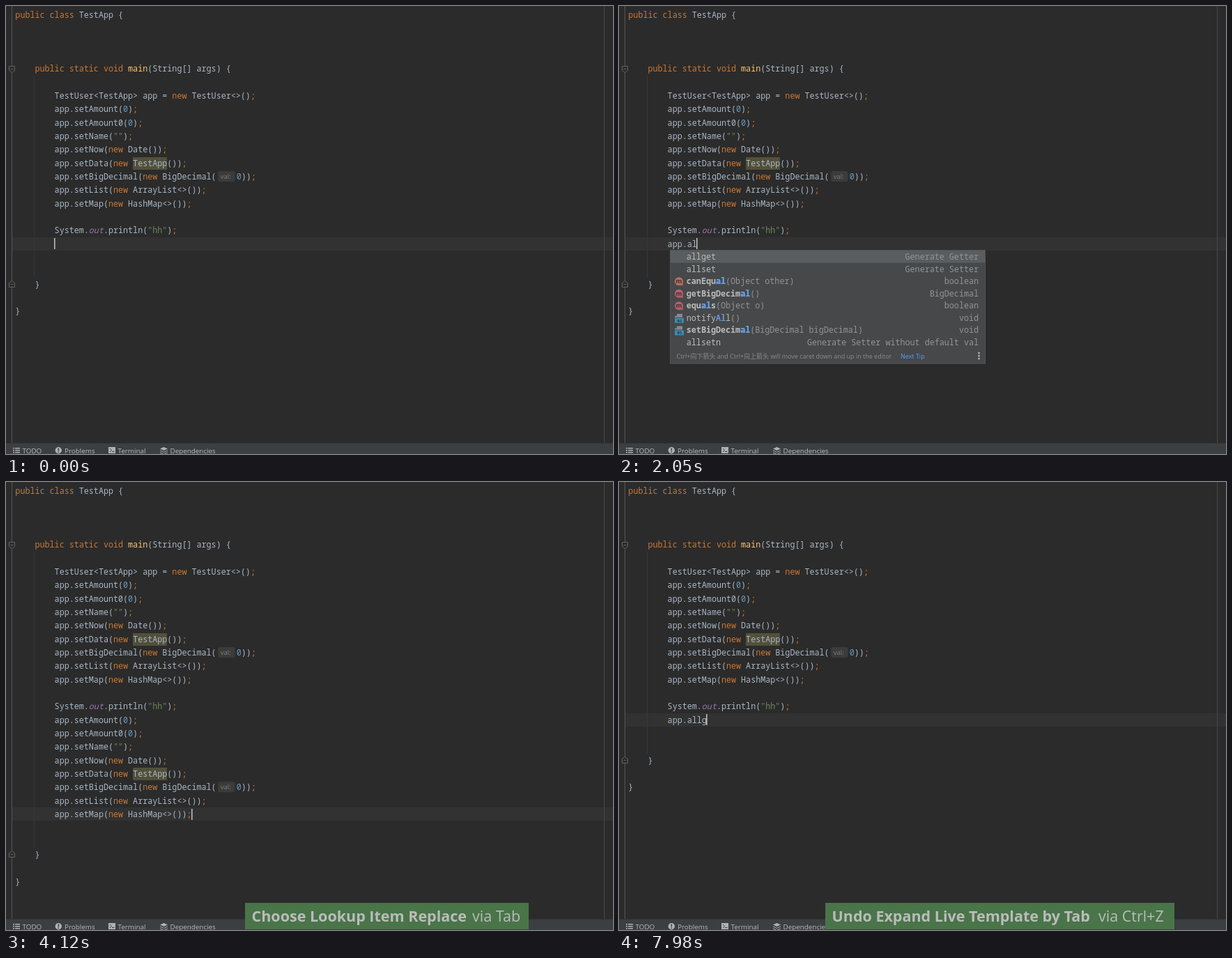
An HTML page with a canvas for the animation above (8000 ms loop, 871 px wide and 643 px high).

```html
<!DOCTYPE html>
<html lang="en">
<head>
<meta charset="utf-8">
<title>Setter templates</title>
<style>
  html, body { margin: 0; width: 100%; height: 100%; overflow: hidden; background: #2b2b2b; }
  canvas { display: block; }
</style>
</head>
<body>
<canvas id="stage" width="871" height="643"></canvas>
<script>
const ctx = document.getElementById('stage').getContext('2d');
const LOOP = 8000, CHAR = 7.032, ROW = 19.33, LEFT = 69.6;
const MONO = '"Noto Sans Mono", "DejaVu Sans Mono", monospace';
const SANS = '"Open Sans", "Noto Sans", "Noto Sans CJK SC", sans-serif';
const CODE = `11.72px ${MONO}`;
const INK = '#a9b7c6', BLUE = '#589df6';

const COLORS = { out: '#9876aa', main: '#ffc66d', ';': '#cc7832' };
for (const word of ['public', 'class', 'static', 'void', 'new']) COLORS[word] = '#cc7832';

// '@' marks a highlighted class, '#' the place of a parameter hint
const SETTERS = [
  'app.setAmount(0);',
  'app.setAmount0(0);',
  'app.setName("");',
  'app.setNow(new Date());',
  'app.setData(new @TestApp());',
  'app.setBigDecimal(new BigDecimal(#0));',
  'app.setList(new ArrayList<>());',
  'app.setMap(new HashMap<>());'
];

const TYPED = [
  [0, ''], [660, 'a'], [790, 'ap'], [930, 'app'], [1450, 'app.'], [1920, 'app.a'],
  [2050, 'app.al'], [2180, 'app.all'], [2380, 'app.alls'], [2450, 'app.allse'],
  [2590, 'app.allset'], [3790, null], [5390, 'app.allset'], [5930, null],
  [6590, 'app.allset'], [7050, 'app.allse'], [7190, 'app.alls'], [7320, 'app.all'],
  [7980, 'app.allg']
];
const CARET_OFF = [[460, 660], [3450, 3790], [4990, 5390]];

// icon, name, parameters, type; a leading '*' means bold
const GET = ['', 'allget', '', 'Generate Getter'];
const SET = ['', 'allset', '', 'Generate Setter'];
const SETN = ['', 'allsetn', '', 'Generate Setter without default val'];
const NOTIFY = ['lib', 'notifyAll', '()', 'void'];
const EQUAL = ['open', '*canEqual', '(Object other)', 'boolean'];
const EQUALS = ['m', '*equals', '(Object o)', 'boolean'];
const GET_BIG = ['m', '*getBigDecimal', '()', 'BigDecimal'];
const SET_BIG = ['lib', '*setBigDecimal', '(BigDecimal bigDecimal)', 'void'];
const AMOUNT = ['lib', '*setAmount', '(int amount)', 'void'];
const NAME = ['lib', '*setName', '(String name)', 'void'];
const DATA = ['lib', '*setData', '(TestApp data)', 'void'];
const MAP = ['lib', '*setMap', '(Map map)', 'void'];
const GET_NAME = ['m', '*getName', '()', 'String'];
const GET_DATA = ['m', '*getData', '()', 'TestApp'];
const POPUPS = [
  [860, 45, [
    ['m', '*app', '', 'TestUser<TestApp>'],
    ['m', 'Appendable', ' java.lang', ''],
    ['m', 'AppletContext', ' java.applet', ''],
    ['m', 'Applet', ' java.applet', ''],
    ['m', 'AppletStub', ' java.applet', '']]],
  [1190],
  [1590, 73, [AMOUNT, NAME, DATA, SET_BIG, MAP, GET_NAME, GET_DATA, GET_BIG, EQUALS, EQUAL, GET, SET], 11.5],
  [1990, 73, [GET, SET, AMOUNT, NAME, DATA, MAP, GET_NAME, GET_DATA, EQUAL, GET_BIG, EQUALS, NOTIFY], 11.5],
  [2050, 73, [GET, SET, EQUAL, GET_BIG, EQUALS, NOTIFY, SET_BIG, SETN]],
  [2180, 73, [GET, SET, NOTIFY, SETN]],
  [2380, 73, [SET, SETN]],
  [3720]
];

// start, box left, box right, action, shortcut, shortcut left
const TOASTS = [
  [3850, 343, 750, 'Choose Lookup Item Replace', 'via Tab', 669],
  [5390, 297, 796, 'Undo Choose Lookup Item Replace', 'via Ctrl+Z', 687],
  [5990, 342, 750, 'Expand Live Template by Tab', 'via Tab', 670],
  [6660, 296, 797, 'Undo Expand Live Template by Tab', 'via Ctrl+Z', 688]
];

const current = (list, t) => list.filter(step => step[0] <= t).pop();
const within = (t, spans) => spans.some(([a, b]) => t >= a && t < b);
const rowTop = row => 3 + ROW * row;

function rect(x, y, w, h, color) {
  ctx.fillStyle = color;
  ctx.fillRect(x, y, w, h);
}

function text(str, x, y, color, font, align = 'left') {
  ctx.font = font;
  ctx.fillStyle = color;
  ctx.textAlign = align;
  ctx.fillText(str, x, y);
}

function disc(x, y, r, color) {
  ctx.fillStyle = color;
  ctx.beginPath();
  ctx.arc(x, y, r, 0, 7);
  ctx.fill();
}

function path(points, color, fill = false, close = true) {
  ctx.beginPath();
  points.forEach(([x, y]) => ctx.lineTo(x, y));
  if (close) ctx.closePath();
  ctx.lineWidth = 1;
  ctx.strokeStyle = ctx.fillStyle = color;
  fill ? ctx.fill() : ctx.stroke();
}

function codeLine(str, col, row, marked = true, hinted = true) {
  const top = rowTop(row), base = top + 14;
  let x = LEFT + col * CHAR;
  for (const part of str.match(/"[^"]*"|\w+|\s+|./g)) {
    if (part === '@') {
      if (marked) rect(Math.round(x), Math.round(top + 1), 49, 18, '#52503a');
      continue;
    }
    if (part === '#') {
      if (hinted) {
        ctx.fillStyle = '#3b3b3b';
        ctx.beginPath();
        ctx.roundRect(x + 2.5, top + 2, 24.5, 15, 3);
        ctx.fill();
        text('val:', x + 6, top + 12.8, '#7c7c7c', `9.6px ${SANS}`);
        x += 29;
      }
      continue;
    }
    const color = part[0] === '"' ? '#6a8759' : /^\d+$/.test(part) ? '#6897bb' : COLORS[part] || INK;
    text(part, x, base, color, part === 'out' ? 'italic ' + CODE : CODE);
    x += part.length * CHAR;
  }
}

function foldMark(row, dir) {
  const y = Math.round(rowTop(row) + 9.5) + 0.5;
  const pts = [[4.5, -4 * dir], [12.5, -4 * dir], [12.5, 2 * dir], [8.5, 5 * dir], [4.5, 2 * dir]];
  const at = pts.map(([x, dy]) => [x, y + dy]);
  path(at, '#2b2b2b', true);
  path(at, '#606366');
  rect(6.5, y - 0.5, 4, 1, '#606366');
}

function itemIcon(kind, x, y) {
  if (!kind) return;
  if (kind === 'lib') {
    rect(x + 3, y - 6, 8, 5, '#858b90');
    rect(x, y, 13, 7, '#3d8cae');
    rect(x, y - 3, 3, 2, '#858b90');
    text('01', x + 3.5, y + 6, '#263a45', `bold 6px ${MONO}`);
    return;
  }
  disc(x + 6, y, 6, kind === 'open' ? '#b7705f' : '#b7606f');
  text('m', x + 6, y + 3, '#3b2d30', `bold 9px ${SANS}`, 'center');
  path([[x + 8, y + 6], [x + 12, y + 2], [x + 12, y + 6]], '#c75450', true);
}

function popupItem(item, x, y, query) {
  const [icon, label, params, type] = item;
  const bold = label[0] === '*', name = label.replace('*', '');
  const font = bold ? 'bold ' + CODE : CODE;
  const hit = icon && query ? name.toLowerCase().lastIndexOf(query) : -1;
  itemIcon(icon, x + 7, y);
  const put = (str, col, color, f) => text(str, x + 23.8 + col * CHAR, y + 4, color, f);
  put(name, 0, '#bbbbbb', font);
  if (hit >= 0) {
    ctx.save();
    ctx.beginPath();
    ctx.rect(x + 23.8 + hit * CHAR, y - 8, query.length * CHAR, 16);
    ctx.clip();
    put(name, 0, BLUE, font);
    ctx.restore();
  }
  put(params, name.length, '#929496', CODE);
  text(type, x + 443, y + 4, '#929496', CODE, 'right');
}

function popup(t, query) {
  const step = current(POPUPS, t);
  if (!step || !step[2]) return;
  const [, x, items, shown = items.length] = step;
  const pitch = 17.58, top = 350, list = shown * pitch + 1, bottom = top + list + 22;
  rect(x, top, 453, list + 22, '#515456');
  rect(x + 1, top + 1, 451, list + 20, '#46484a');
  ctx.save();
  ctx.beginPath();
  ctx.rect(x, top, 453, list);
  ctx.clip();
  rect(x + 1, top + 1, 451, pitch, '#5a5d5f');
  items.forEach((item, i) => popupItem(item, x, top + 10 + i * pitch, query));
  ctx.restore();
  const font = `9px ${SANS}`, base = bottom - 7.5;
  text('Ctrl+向下箭头 and Ctrl+向上箭头 will move caret down and up in the editor', x + 9.5, base, '#8c8c8c', font);
  text('Next Tip', x + 331, base, BLUE, font);
  for (let i = -1; i < 2; i++) disc(x + 443.5, bottom - 11.5 + i * 4, 1.3, '#afb1b3');
  if (t >= 3120) {
    disc(x + 425.5, bottom - 13, 4.5, '#d9a343');
    rect(x + 423, bottom - 8, 5, 1.2, '#afb1b3');
    rect(x + 424, bottom - 6, 3, 1.2, '#afb1b3');
  }
}

function statusBar() {
  const gray = '#afb1b3';
  rect(0, 627, 871, 1, '#323232');
  rect(0, 628, 871, 15, '#3c3f41');
  for (let i = 0; i < 3; i++) {
    rect(10, 634 + i * 3, 2, 1.5, gray);
    rect(13, 634 + i * 3, 7, 1.5, gray);
  }
  disc(75.3, 637.7, 4.7, gray);
  rect(74.6, 634.5, 1.5, 4, '#3c3f41');
  rect(74.6, 639.5, 1.5, 1.5, '#3c3f41');
  rect(147, 633, 10, 9, gray);
  path([[149, 635], [151.5, 637.5], [149, 640]], '#3c3f41', false, false);
  rect(152, 639, 3.5, 1, '#3c3f41');
  path([[221, 635.5], [226.5, 633], [232, 635.5], [226.5, 638]], gray, true);
  for (const y of [638, 641]) path([[221, y], [226.5, y + 2.5], [232, y]], gray, false, false);
  [['TODO', 23.5], ['Problems', 84], ['Terminal', 160.5], ['Dependencies', 235.5]]
    .forEach(([label, x]) => text(label, x, 641.7, '#bbbbbb', `9.85px ${SANS}`));
}

function toast(t) {
  const step = current(TOASTS, t);
  if (!step) return;
  const [start, left, right, action, keys, keysX] = step;
  ctx.globalAlpha = start === 3850 && t < 3920 ? 0.5 : 1;
  rect(left, 604, right - left, 38, '#497549');
  text(action, left + 9.5, 631, '#bbbbbb', `bold 21.5px ${SANS}`);
  text(keys, keysX, 631, '#bbbbbb', `21.5px ${SANS}`);
  ctx.globalAlpha = 1;
}

function draw(t) {
  const typed = current(TYPED, t)[1];
  const expanded = typed === null;
  const shift = expanded ? 7 : 0, caretRow = 17 + shift;
  const caretCol = expanded ? 28 : typed.length;

  rect(0, 0, 871, 643, '#2b2b2b');
  rect(9, Math.round(rowTop(caretRow)), 862, 19, '#323232');
  rect(8, 0, 1, 628, '#555555');
  rect(858, 0, 1, 628, '#484848');
  rect(40, 100, 1, rowTop(20 + shift) - 100, '#393939');
  foldMark(4, 1);
  foldMark(20 + shift, -1);

  if (t >= 1190 && t < 1450) {
    rect(196, Math.round(rowTop(6)), 21, 19, '#344134');
    rect(69, Math.round(rowTop(17)), 22, 19, '#344134');
  }

  codeLine('public class TestApp {', -8, 0);
  codeLine('public static void main(String[] args) {', -4, 4);
  codeLine('TestUser<TestApp> app = new TestUser<>();', 0, 6);
  SETTERS.forEach((line, i) => codeLine(line, 0, 7 + i));
  codeLine('System.out.println("hh");', 0, 16);
  if (expanded) {
    const marked = within(t, [[4120, 5390], [6260, 6590]]);
    const hinted = within(t, [[4120, 5390], [6330, 6590]]);
    SETTERS.forEach((line, i) => codeLine(line, 0, 17 + i, marked, hinted));
  } else if (typed) {
    codeLine(typed, 0, 17);
  }
  codeLine('}', -4, 20 + shift);
  codeLine('}', -8, 22 + shift);

  if (!within(t, CARET_OFF)) {
    rect(Math.round(69 + caretCol * CHAR), Math.round(rowTop(caretRow) + 1.6), 1.6, 16, '#bbbbbb');
  }

  statusBar();
  popup(t, expanded ? '' : typed.split('.').pop());
  toast(t);
}

const begin = performance.now();
function frame() {
  draw((performance.now() - begin) % LOOP);
  requestAnimationFrame(frame);
}
frame();
</script>
</body>
</html>
```
